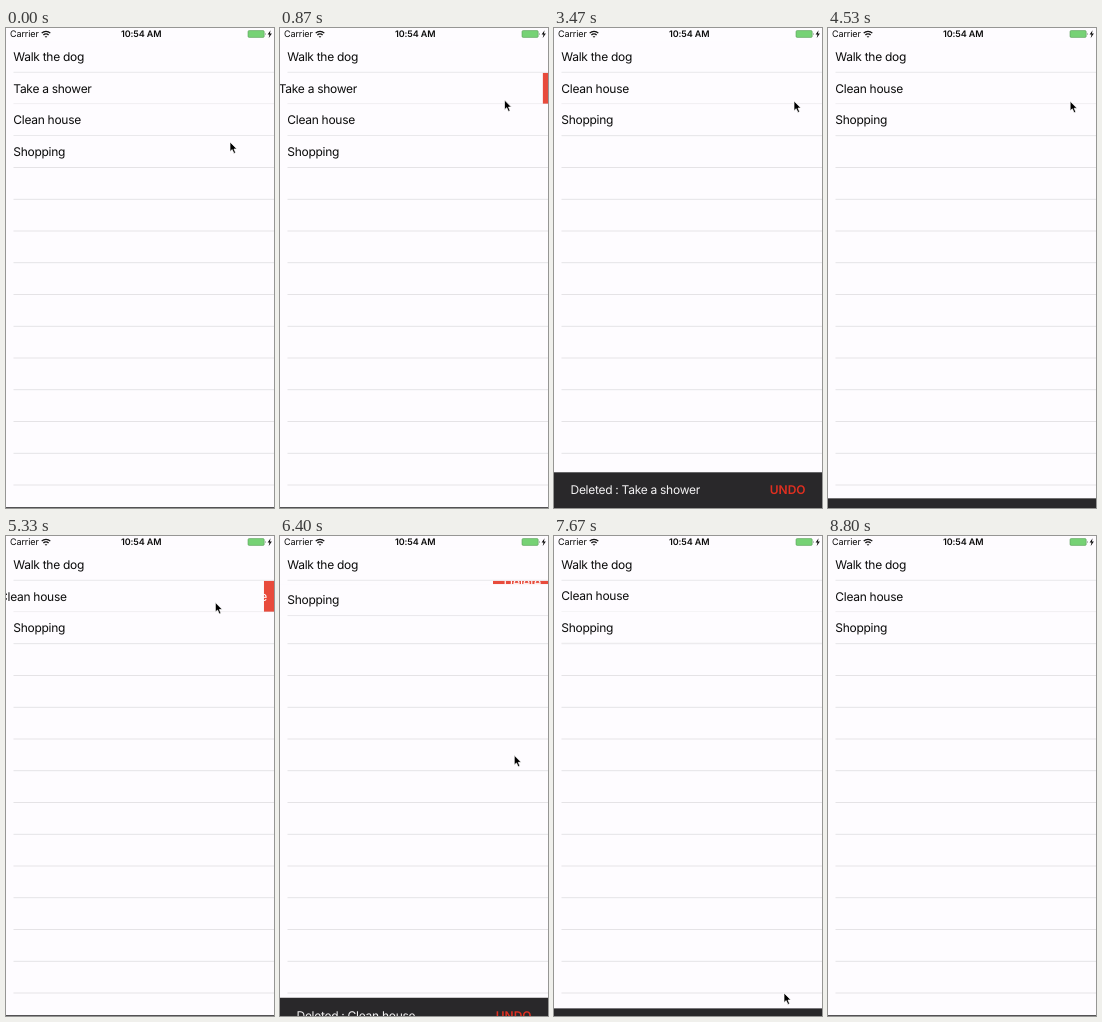
An HTML page that plays this animation: 268 px wide and 480 px high, repeating every 9470 ms.

```html
<!DOCTYPE html>
<html lang="en">
<head>
<meta charset="utf-8">
<title>Swipe to delete with undo</title>
<style>
  html, body { margin: 0; width: 100%; height: 100%; overflow: hidden; background: #fefcff; }
  #stage { display: block; width: 268px; height: 480px; }
  text { font: 12px Inter, "Open Sans", sans-serif; letter-spacing: -.28px; fill: #0c0c0c; text-rendering: geometricPrecision; }
  .status { font-size: 9px; letter-spacing: -.1px; }
  .time { font-weight: 600; text-anchor: middle; }
  .paper { fill: #fefcff; }
  .rule { fill: #dfdde0; }
  .delete { font-size: 13px; letter-spacing: -.33px; fill: #fff; }
  .message { fill: #f4f3f4; }
  .undo { fill: #e02f20; font-weight: 600; letter-spacing: 0; }
</style>
</head>
<body>
<svg id="stage" viewBox="0 0 268 480">
  <rect class="paper" width="268" height="480"/>
  <text class="status" x="4" y="9.2">Carrier</text>
  <g fill="none" stroke="#111" stroke-width="1.3">
    <path d="M35.7 5.1a6 6 0 0 1 8.6 0M37.4 7a3.7 3.7 0 0 1 5.2 0"/>
    <path d="M38.6 8.2h2.8L40 9.8z" fill="#111" stroke="none"/>
  </g>
  <text class="status time" x="135.2" y="9.2">10:54 AM</text>
  <rect x="242" y="2.6" width="16.2" height="6.8" rx="1.2" fill="#76d275" stroke="#5d9e5d" stroke-width=".6"/>
  <path d="M259 4.8q1.2 1.2 0 2.4z" fill="#555"/>
  <path d="M264.6 2.3l-3 4.2h1.9l-.8 3.4 3.2-4.4h-2z" fill="#111"/>

  <g id="rules"></g>
  <g id="rows"></g>

  <g id="toast">
    <rect width="268" height="40" fill="#29282a"/>
    <text id="message" class="message" x="16.5" y="21.8"></text>
    <text class="undo" x="215.7" y="21.8">UNDO</text>
  </g>
  <path id="cursor" d="M0 0V9.6L2.2 7.6 3.9 11.4 5.6 10.7 4 7H6.9Z" fill="#000" stroke="#fff" stroke-width=".7" stroke-linejoin="round"/>
</svg>
<script>
const LOOP = 9470, FRAME = 1000 / 15;
const WIDTH = 268, TOP = 12.6, ROW = 31.75, OPEN = 55;
const UNDO = 7380, POINTER_HIDES = 8790;
const $ = id => document.getElementById(id);

function set(el, attrs) {
  for (const name in attrs) el.setAttribute(name, attrs[name]);
}
function add(parent, tag, attrs, text = '') {
  const el = document.createElementNS('http://www.w3.org/2000/svg', tag);
  set(el, attrs);
  el.textContent = text;
  return parent.appendChild(el);
}
function addRule(parent, y) {
  return add(parent, 'rect', { class: 'rule', x: 7.5, y: y - .5, width: WIDTH, height: .8 });
}
const shownIf = visible => visible ? 'inline' : 'none';

// Smooth 0 to 1 ramp
function ramp(t, start, duration) {
  const x = Math.min(1, Math.max(0, (t - start) / duration));
  return x * x * (3 - 2 * x);
}

// Each move eases the pointer to a new place
const home = { x: 224, y: 114 };
const moves = [
  { at: 50, lasts: 550, x: 234, y: 73 },    // to the first row
  { at: 767, lasts: 400, x: 173, y: 67 },   // swipe
  { at: 1250, lasts: 480, x: 252, y: 63.5 },  // Delete
  { at: 1940, lasts: 700, x: 235, y: 452 }, // towards Undo
  { at: 2900, lasts: 400, x: 240, y: 73 },  // and back
  { at: 3450, lasts: 350, x: 241, y: 82 },
  { at: 3950, lasts: 1050, x: 243, y: 67 },
  { at: 5200, lasts: 266, x: 176, y: 66 },  // swipe
  { at: 5650, lasts: 480, x: 237, y: 68 },  // Delete
  { at: 6200, lasts: 470, x: 230, y: 457 }, // Undo
  { at: 7690, lasts: 560, x: 144, y: 124 },
  { at: 8370, lasts: 90, x: 139, y: 123 },
  { at: 8690, lasts: 45, x: 121, y: 114 }
];

function pointerAt(t) {
  return moves.reduce((p, move) => {
    const k = ramp(t, move.at, move.lasts);
    return { x: p.x + (move.x - p.x) * k, y: p.y + (move.y - p.y) * k };
  }, home);
}

function makeRow(label, swipedAt = Infinity, deletedAt = Infinity) {
  const view = add($('rows'), 'svg', { width: WIDTH, overflow: 'hidden' });
  add(view, 'rect', { class: 'paper', width: WIDTH, height: ROW + 1 });
  const title = add(view, 'text', {}, label);
  const button = add(view, 'svg', { overflow: 'hidden' });
  add(button, 'rect', { width: OPEN, height: ROW, fill: '#e84b3c' });
  const action = add(button, 'text', { class: 'delete' }, 'Delete');
  const rule = addRule(view, ROW);
  return { view, title, button, action, rule, swipedAt, deletedAt };
}

// Draws a row at y and returns the height it takes up
function drawRow(row, y, t, restored) {
  const removed = ramp(t, row.deletedAt, 240);
  const height = ROW * (1 - removed * (1 - restored));
  const swipe = restored ? 0 : ramp(t, row.swipedAt, 400);
  const reveal = OPEN * swipe ** 1.25;
  const display = shownIf(removed < .01 || restored);

  set(row.view, { y, height: height + .3, display: shownIf(height > .05) });
  set(row.title, { x: 7.3 - OPEN * swipe, y: height / 2 + 4.4, display });
  set(row.button, { x: WIDTH - reveal, width: reveal, height, display: shownIf(reveal > 0) });
  set(row.action, { x: reveal - 44.4, y: height / 2 + 4.8 });
  set(row.rule, { display });
  return height;
}

for (let i = 1; i <= 14; i++) addRule($('rules'), TOP + i * ROW);
const shower = makeRow('Take a shower', 767, 1862);
const house = makeRow('Clean house', 5200, 6212);
const walk = makeRow('Walk the dog'), shopping = makeRow('Shopping');

const toasts = [
  { item: 'Take a shower', up: 1900, down: 4265 },
  { item: 'Clean house', up: 6200, down: UNDO }
];

function draw(t) {
  const restored = ramp(t, UNDO, 310);
  let y = TOP;
  y += drawRow(walk, y, t, 0);
  y += drawRow(shower, y, t, 0);
  y += drawRow(house, y, t, restored);
  drawRow(shopping, y, t, 0);

  const toast = toasts[t < 5000 ? 0 : 1];
  const raised = ramp(t, toast.up, 400) - ramp(t, toast.down, 400);
  set($('toast'), { transform: `translate(0 ${479.2 - 34.9 * raised})` });
  $('message').textContent = 'Deleted : ' + toast.item;

  const { x, y: py } = pointerAt(t);
  set($('cursor'), { transform: `translate(${x} ${py})`, display: shownIf(t < POINTER_HIDES) });
}

const begin = performance.now();
function tick() {
  const t = Math.max(0, performance.now() - begin) % LOOP;
  draw(Math.floor((t + 3.4) / FRAME) * FRAME);
  requestAnimationFrame(tick);
}
tick();
</script>
</body>
</html>
```
